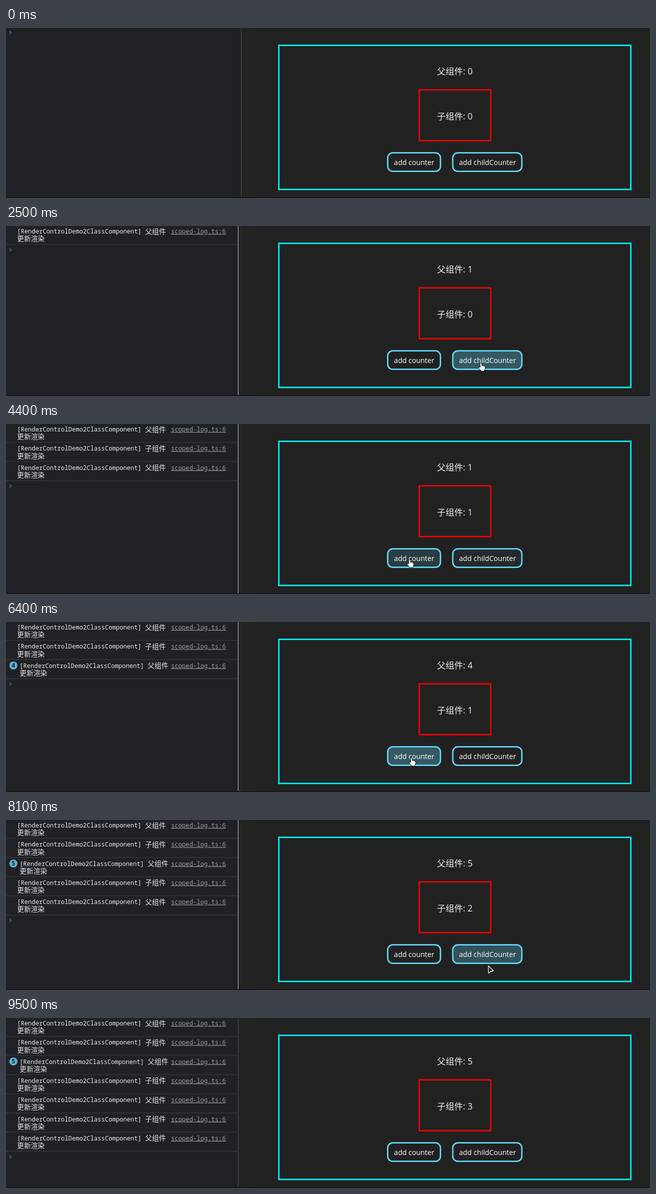
Write an HTML page that moves like this. It is 1280x340 px and loops after 9700 ms.

```html
<!DOCTYPE html>
<html lang="zh-CN">
<head>
<meta charset="utf-8">
<title>Render log</title>
<style>
html, body { margin: 0; width: 100%; height: 100%; overflow: hidden; background: #202124; }
svg { display: block; }
text { white-space: pre; }
.ui { font: 500 14.1px "Open Sans", "Noto Sans CJK SC", "Noto Sans CJK", sans-serif; fill: #fff; }
.count { font-size: 17.3px; fill: #eee; }
.log { font: 12.13px "Noto Sans Mono", monospace; fill: #e8eaed; }
.tag { font-weight: 500; }
.zh { font: 13.7px "Noto Sans CJK SC", "Noto Sans CJK", sans-serif; }
.link { fill: #9aa0a6; text-decoration: underline; }
.badge { font: bold 12px "Open Sans", sans-serif; fill: #202124; text-anchor: middle; }
</style>
</head>
<body>
<svg width="1280" height="340" viewBox="0 0 1280 340">
  <rect width="1280" height="340" fill="#202124"/>
  <g id="logs"></g>
  <path id="prompt" d="M7 6l3.5 3.3L7 12.6" fill="none" stroke="#3f78c4" stroke-width="1.4"/>
  <rect id="page" y="0" width="820" height="340" fill="#232422"/>
  <path d="M497 340V12Q497 0 509 0H1267Q1279 0 1279 12V340Z" fill="#212121"/>
  <rect id="divider" width="1" height="340"/>
  <rect y="338" width="1280" height="2" fill="#1d171b"/>
  <g fill="none" stroke-width="2.8">
    <rect x="542.3" y="34.7" width="699.6" height="288.2" stroke="#00f2fa"/>
    <rect x="821.3" y="123.7" width="142" height="101.6" stroke="#f00000"/>
  </g>
  <text id="parent" class="ui count" x="856.5" y="92.5"></text>
  <text id="child" class="ui count" x="856.5" y="182.5"></text>
  <g stroke="#61dafb" stroke-width="2.8" fill="#61dafb">
    <rect id="btnParent" x="758.7" y="249.7" width="104.8" height="37" rx="10"/>
    <rect id="btnChild" x="888" y="249.7" width="137.2" height="37" rx="10"/>
  </g>
  <text class="ui" x="771.3" y="273.6">add counter</text>
  <text class="ui" x="900.5" y="273.6">add childCounter</text>
  <g id="cursor" stroke-linejoin="round">
    <path id="arrow" d="M.8 .5V14.2Q1 15.8 2.3 14.7L5.3 11.5H9.5Q11 11.3 10 10Z" fill="#111" stroke="#fff" stroke-width="1.3"/>
    <path id="hand" d="M-1.7 1.2Q-1.6-.3 0-.3T1.6 1.2V5Q3.2 4.2 4 5.6 5.6 5 6.2 6.4 8.2 6 8.2 8V11Q8.2 13 6.8 14.6V16H-.5V14.8L-4.3 10.2Q-5.2 8.6-4 8T-1.7 9Z" fill="#fff" stroke="#111"/>
  </g>
</svg>
<script>
const LOOP = 9700, STEP = 100, PITCH = 38.3;
const $ = id => document.getElementById(id);

const parentClicks = [1000, 5000, 5700, 6100, 6700];
const childClicks = [3100, 7700, 8400];

// pointer moves: start, end, target x, target y, sag below the straight line
const START = [850, 336];
const moves = [
  [300, 900, 812, 275, 0],
  [1300, 1900, 838, 275, 31],
  [1900, 2300, 944, 274, 6],
  [3300, 3850, 944, 274, 40],
  [4000, 4400, 802, 271, 5],
  [6200, 6400, 806, 272, 0],
  [6900, 7500, 944, 270, 17],
  [8000, 8200, 972, 270, 21],
  [8600, 8800, 985, 291, 0]
];

const rows = [[parentClicks[0], "父组件"]];
for (const c of childClicks) rows.push([c, "子组件"], [c, "父组件"]);

$("logs").innerHTML = rows.map(([, name], i) => `
  <g id="row${i}" class="log" transform="translate(0 ${i * PITCH})">
    <g id="msg${i}">
      <text class="tag" x="22" y="15">[RenderControlDemo2ClassComponent]</text>
      <text class="zh" x="276.5" y="15.5">${name}</text>
      <text class="zh" x="22" y="30.3">更新渲染</text>
    </g>
    <text class="link" x="328" y="15">scoped-log.ts:6</text>
    <path d="M0 36.7H462" stroke="#3c4043"/>
  </g>`).join("") +
  `<g id="badge"><circle cx="14.7" cy="87" r="8" fill="#5db0d7"/>
   <text id="repeat" class="badge" x="14.7" y="91.4"></text></g>`;

const countBefore = (times, t) => times.filter(c => c <= t).length;
const clamp = v => Math.min(1, Math.max(0, v));
const smooth = k => k * k * (3 - 2 * k);
const show = (id, on) => $(id).style.display = on ? "" : "none";

function pointer(t) {
  let [x, y] = START;
  for (const [from, to, tx, ty, sag] of moves) {
    const k = clamp((t - from) / (to - from)), e = smooth(k);
    x += (tx - x) * e;
    y += (ty - y) * e + sag * Math.sin(Math.PI * k);
  }
  return [x, y];
}

function isOver(id, [x, y]) {
  const b = $(id), at = name => +b.getAttribute(name);
  return x > at("x") && x < at("x") + at("width") && y > at("y") && y < at("y") + at("height");
}

// hover fill grows while the pointer is over the button and fades afterwards
function hoverLevel(id, t) {
  let v = 0;
  for (let s = 0; s <= t; s += STEP) v = clamp(v + (isOver(id, pointer(s)) ? .25 : -.25));
  return smooth(v);
}

function draw(t) {
  const parents = countBefore(parentClicks, t), children = countBefore(childClicks, t);
  $("parent").textContent = "父组件: " + parents;
  $("child").textContent = "子组件: " + children;

  rows.forEach(([at], i) => show("row" + i, t >= at));
  const shown = rows.filter(r => t >= r[0]).length;
  $("prompt").setAttribute("transform", `translate(0 ${shown * PITCH})`);
  show("badge", parents > 1);
  $("repeat").textContent = parents;
  $("msg2").setAttribute("transform", `translate(${parents > 1 ? 5 : 0} 0)`);

  const edge = shown ? 461 : 467;
  $("page").setAttribute("x", edge);
  $("divider").setAttribute("x", edge);
  $("divider").setAttribute("fill", shown && t < 9500 ? "#c4c6c8" : "#4b4d50");

  const p = pointer(t), buttons = ["btnParent", "btnChild"];
  for (const id of buttons) $(id).style.fillOpacity = .3 * hoverLevel(id, t);
  const over = buttons.some(id => isOver(id, p));
  show("cursor", t >= moves[0][0] && t < 8900);
  show("hand", over);
  show("arrow", !over);
  $("cursor").setAttribute("transform", `translate(${p})`);
}

function tick() {
  draw(Math.floor(performance.now() % LOOP / STEP) * STEP);
  requestAnimationFrame(tick);
}
tick();
</script>
</body>
</html>
```
